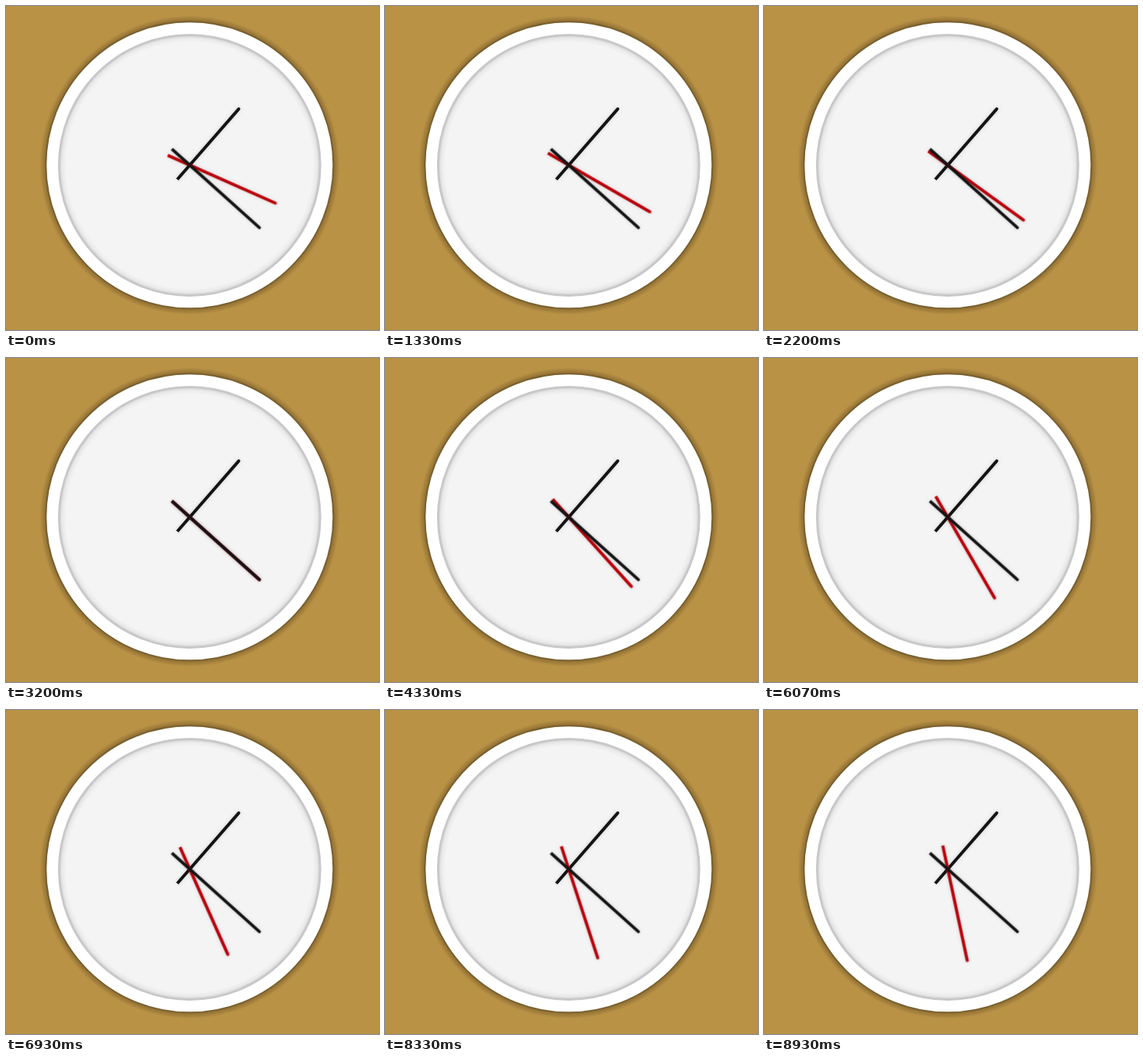
Write an HTML page that moves like this. It is 480x418 px and loops after 9190 ms.

```html
<!DOCTYPE html>
<html lang="en">
<head>
<meta charset="utf-8">
<title>Clock</title>
<style>
  html, body { margin: 0; width: 100%; height: 100%; overflow: hidden; background: #b99246; }
  svg { display: block; width: 480px; height: 418px; }
  .hand { filter: drop-shadow(0 0 2.5px rgba(0, 0, 0, .14)); }
  .second { animation: tick 9190ms step-end infinite; }

  /* one 6 degree jump per second */
  @keyframes tick {
    0% { transform: rotate(114deg); }
    4.68% { transform: rotate(120deg); }
    15.56% { transform: rotate(126deg); }
    26.44% { transform: rotate(132deg); }
    37.32% { transform: rotate(138deg); }
    48.2% { transform: rotate(144deg); }
    59.09% { transform: rotate(150deg); }
    69.97% { transform: rotate(156deg); }
    80.85% { transform: rotate(162deg); }
    91.73%, 100% { transform: rotate(168deg); }
  }
</style>
</head>
<body>
<svg viewBox="0 0 480 418">
  <defs>
    <radialGradient id="glow" gradientUnits="userSpaceOnUse" cx="236.3" cy="205.3" r="193">
      <stop offset=".955" stop-color="#5a4118" stop-opacity=".5"/>
      <stop offset="1" stop-color="#5a4118" stop-opacity="0"/>
    </radialGradient>
    <radialGradient id="face" gradientUnits="userSpaceOnUse" cx="236.3" cy="205.5" r="168">
      <stop offset=".945" stop-color="#f4f4f4"/>
      <stop offset=".975" stop-color="#eaeaea"/>
      <stop offset="1" stop-color="#d0d0d0"/>
    </radialGradient>
    <path id="long" d="M-2 31V-120.5a2 2 0 0 1 4 0V31z"/>
  </defs>

  <circle cx="236.3" cy="205.3" r="193" fill="url(#glow)"/>
  <circle cx="236.3" cy="205.3" r="185" fill="#fff" stroke="#79602f" stroke-width="2"/>
  <circle cx="236.3" cy="205.5" r="168" fill="url(#face)" stroke="#c8c8ca" stroke-width="2.8"/>

  <g transform="translate(236.5 205.3)">
    <g class="hand"><path d="M-2 24.5V-96a2 2 0 0 1 4 0V24.5z" fill="#141414" transform="rotate(41)"/></g>
    <g class="hand"><use href="#long" class="second" fill="#b9000b"/></g>
    <g class="hand"><use href="#long" fill="#141414" transform="rotate(132)"/></g>
  </g>
</svg>
</body>
</html>
```
